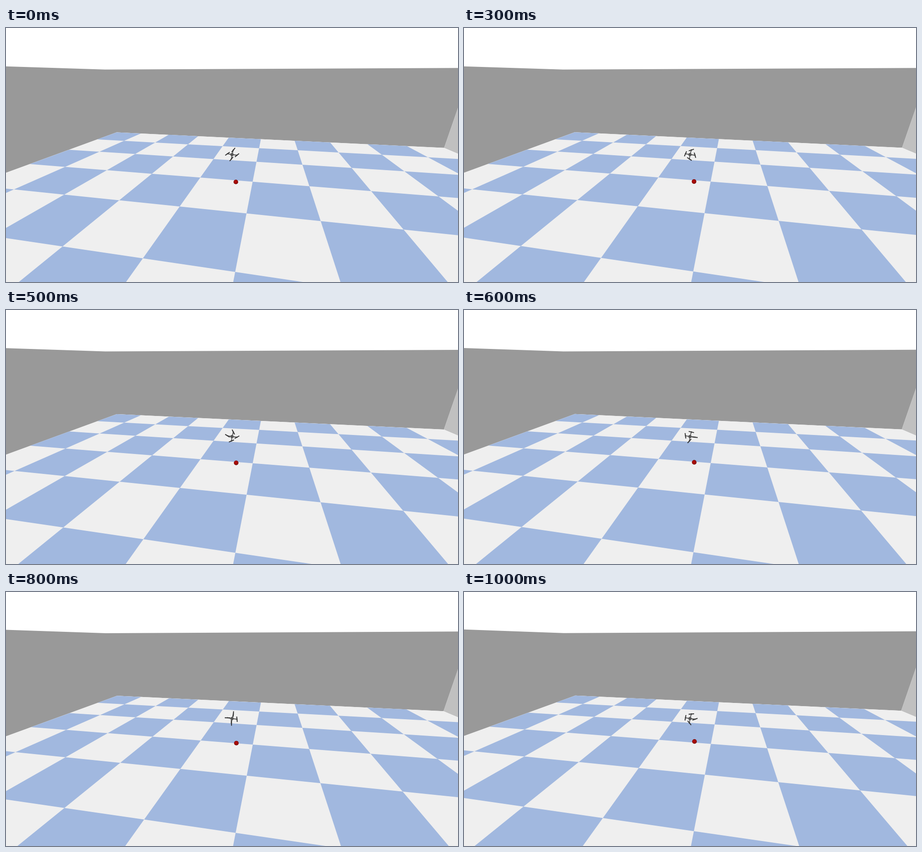
Animation of 998x561 px, one loop 1100 ms. Source, as an HTML page with a canvas:

```html
<!DOCTYPE html>
<html lang="en">
<head>
<meta charset="utf-8">
<title>Drone over a checkered floor</title>
<style>
  html, body { margin: 0; width: 100%; height: 100%; overflow: hidden; background: #fff; }
  canvas { display: block; }
</style>
</head>
<body>
<canvas id="stage" width="998" height="561"></canvas>
<script>
const ctx = document.getElementById('stage').getContext('2d');
const W = 998, H = 561, STEP = 100, STEPS = 11;
const rad = deg => deg * Math.PI / 180;

// Pinhole camera, 60 degree vertical field of view; lengths are in floor tiles.
const FOCAL = H / 2 / Math.tan(rad(30));
const sinP = Math.sin(rad(20)), cosP = Math.cos(rad(20));
const sinY = Math.sin(rad(10)), cosY = Math.cos(rad(10));
const BACK = 6.535, LEFT = -5.157, RIGHT = 4.643, WALL = 2;
const FIRST_ROW = 6.64, FIRST_COL = -5.257;
let eyeHeight, retreat;

// u runs away from the viewer, v to the right, z up.
function project([u, v, z = 0]) {
  u += retreat;
  const ahead = u * cosY - v * sinY;
  const side = u * sinY + v * cosY;
  const below = eyeHeight - z;
  const scale = FOCAL / (ahead * cosP + below * sinP);
  return [W / 2 + side * scale, H / 2 + (below * cosP - ahead * sinP) * scale];
}

function face(color, ...points) {
  ctx.fillStyle = color;
  ctx.beginPath();
  for (const p of points) ctx.lineTo(...project(p));
  ctx.fill();
}

function drawRoom() {
  face('#999999', [3, LEFT, WALL], [BACK, LEFT, WALL], [BACK, RIGHT, WALL],
    [BACK, RIGHT], [BACK, LEFT], [3, LEFT]);
  face('#c0c0c0', [BACK, RIGHT, WALL], [4, RIGHT, WALL], [4, RIGHT], [BACK, RIGHT]);
  face('#efefef', [BACK, LEFT], [BACK, RIGHT], [0.64, RIGHT], [0.64, LEFT]);
  for (let row = 0; row < 6; row++) {
    for (let col = row % 2; col < 10; col += 2) {
      const far = Math.min(BACK, FIRST_ROW - row), near = FIRST_ROW - row - 1;
      const left = Math.max(LEFT, FIRST_COL + col);
      const right = Math.min(RIGHT, FIRST_COL + col + 1);
      face('#a1b8df', [far, left], [far, right], [near, right], [near, left]);
    }
  }
}

function line(x1, y1, x2, y2, color, width) {
  ctx.strokeStyle = color;
  ctx.lineWidth = width;
  ctx.beginPath();
  ctx.moveTo(x1, y1);
  ctx.lineTo(x2, y2);
  ctx.stroke();
}

function disc(x, y, r, fill) {
  ctx.fillStyle = fill;
  ctx.beginPath();
  ctx.arc(x, y, r, 0, 2 * Math.PI);
  ctx.fill();
}

function drawDrone(k) {
  const x = 499, y = 279.5;
  const rotors = [
    [502, 269.5, -50 - 49.5 * k],
    [489, 277.8, -35 + 49.5 * k],
    [510, 281, -40 + 38 * k],
    [497.7, 289.3, 130 - 35 * k + 0.9 * k * k]
  ];
  for (const [rx, ry] of rotors) line(x, y, rx, ry, '#505050', 1.8);
  disc(x, y, 3.6, '#555555');
  for (const [rx, ry, angle] of rotors) {
    const dx = 6 * Math.cos(rad(angle)), dy = 6 * Math.sin(rad(angle));
    line(rx - dx, ry - dy, rx + dx, ry + dy, '#303030', 2);
    disc(rx, ry, 1.4, '#383838');
  }
}

function drawBall(t) {
  const x = 507.5 + 1.4 * t, y = 340 - 9.8 * t * t;
  const shade = ctx.createRadialGradient(x - 1, y - 1, 1, x, y, 5.2);
  shade.addColorStop(0, '#b00c06');
  shade.addColorStop(0.6, '#a00a05');
  shade.addColorStop(1, '#6c0503');
  disc(x, y, 5.1, shade);
}

function frame(now) {
  const k = Math.floor(now / STEP) % STEPS, t = k / (STEPS - 1);
  eyeHeight = 1.8433 - 0.0166 * t * t;
  retreat = 0.043 * t * t;
  ctx.fillStyle = '#fff';
  ctx.fillRect(0, 0, W, H);
  drawRoom();
  drawDrone(k);
  drawBall(t);
  requestAnimationFrame(() => frame(performance.now() - start));
}

const start = performance.now();
frame(0);
</script>
</body>
</html>
```
